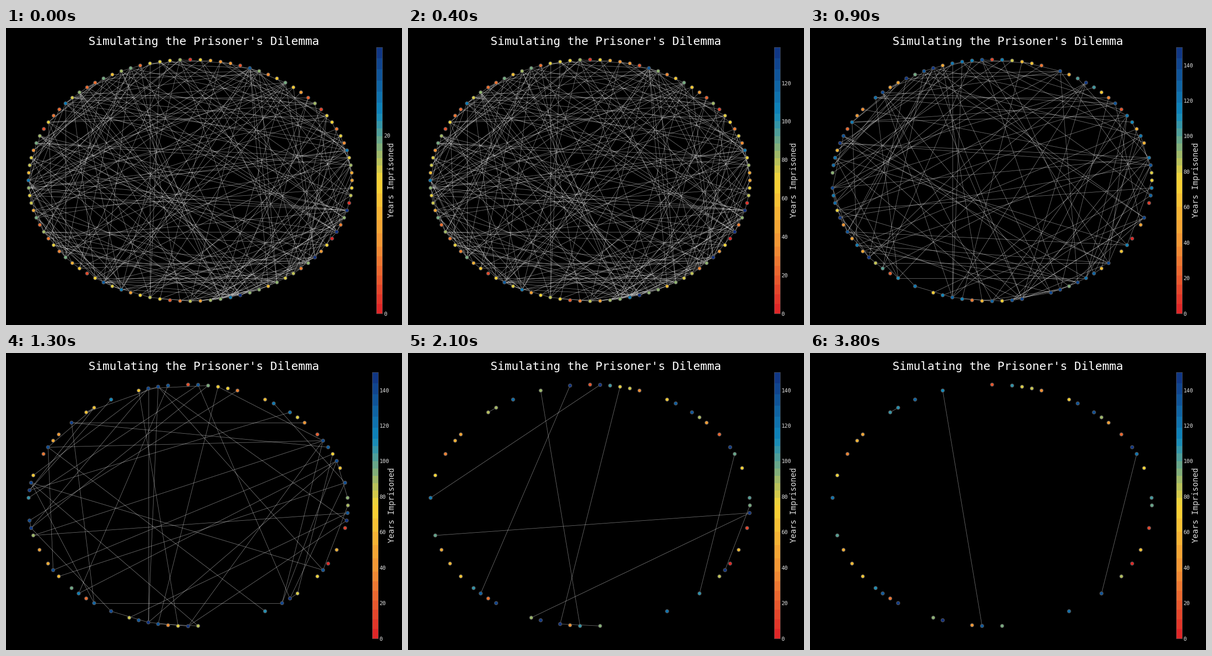
These frames come from a looping animation (864 by 648 pixels, 4 s). A matplotlib script:

```python
import numpy as np
import matplotlib.pyplot as plt
from matplotlib.animation import FuncAnimation
from matplotlib.collections import LineCollection
from matplotlib.colors import LinearSegmentedColormap

W, H, DPI = 864, 648, 72
N, LIMIT = 100, 150
STEPS, LAST = 40, 38
SETTLE, SLOW = 10, 22

plt.rcParams["font.family"] = "DejaVu Sans Mono"

# Players who stay, from the mildest sentence to the harshest.
STAYERS = [92, 97, 25, 10, 64, 43, 20, 73, 12, 40, 56, 41, 58, 94, 60, 17, 5,
           46, 22, 21, 90, 13, 69, 76, 0, 54, 1, 23, 62, 36, 35, 30, 49, 83,
           33, 7, 63, 16, 14, 74, 87, 65, 8, 70]
# Players who leave, by wave; everybody else goes in the third one.
FIRST = [4, 19, 39, 50, 66, 68, 79, 80, 89, 93, 96]
SECOND = [2, 11, 15, 18, 26, 31, 32, 34, 37, 44, 45, 51, 55, 57, 61, 77, 78,
          81, 82, 84, 88, 95]
FOURTH = [24, 27, 72, 91, 99]
THIRD = sorted(set(range(N)) - set(STAYERS + FIRST + SECOND + FOURTH))

ENDLESS = [(30, 74), (7, 87), (35, 36)]
LONG = [(24, 49), (27, 63), (22, 72), (54, 99), (69, 99), (0, 91), (72, 76),
        (38, 12), (65, 85), (29, 71), (47, 91), (14, 48), (3, 60), (42, 83)]

# Wave members, range of leaving steps, games each one plays.
WAVES = [(FIRST, (5, 8), 10), (SECOND, (10, 13), 4), (THIRD, (14, 21), 2),
         (FOURTH, (23, 29), 0)]

rng = np.random.default_rng(7)


def final_years():
    """Level each player's years settle at; above the limit means removal."""
    level = np.empty(N)
    level[STAYERS] = 4 + 146 * np.linspace(0, 1, len(STAYERS)) ** 0.75
    for wave, (lo, hi), _ in WAVES:
        leave = rng.integers(lo, hi, len(wave))
        level[wave] = LIMIT / np.tanh((leave + 0.5) / SETTLE)
    return level


def build_edges(level):
    edges = set(ENDLESS + LONG)
    chance = np.minimum(level, LIMIT)
    for wave, _, games in WAVES:
        for a in wave:
            p = chance.copy()
            p[a] = 0
            for b in rng.choice(N, games, replace=False, p=p / p.sum()):
                edges.add((a, int(b)))
        chance[wave] = 0
    return np.array(sorted(edges))


LEVEL = final_years()
EDGES = build_edges(LEVEL)
PACE = np.full(N, SETTLE)
PACE[np.ravel(ENDLESS)] = SLOW
ANGLE = 2 * np.pi * np.arange(N) / N

CMAP = LinearSegmentedColormap.from_list(
    "years", ["#de1f26", "#f39134", "#fad734", "#0e89be", "#103080"])

fig = plt.figure(figsize=(W / DPI, H / DPI), dpi=DPI, facecolor="black")
ax = fig.add_axes([0, 0, 1, 1])
ax.set(xlim=(0, W), ylim=(H, 0))
ax.axis("off")
ax.text(432, 37, "Simulating the Prisoner's Dilemma", color="white",
        size=25.4, ha="center", va="baseline")
label = ax.text(841, 332, "Years Imprisoned", color="#dddddd", size=17,
                rotation=90, ha="center", va="center")
lines = LineCollection([], colors="white", linewidths=0.75, alpha=0.55,
                       zorder=1)
ax.add_collection(lines)
dots = ax.scatter([], [], s=56, c=[], cmap=CMAP, edgecolors="#555555",
                  linewidths=1.2, zorder=2)

BAR_TOP, BAR_BOTTOM, BAR_W = 42, 622.5, 13
bar = fig.add_axes([0, 0, 0.1, 0.1], facecolor="black")
# Each leg of the colour map has its own number of bands.
bands = np.concatenate(
    [(leg + np.arange(n) / n) / 4 for leg, n in enumerate((7, 5, 9, 6))]
    + [[1]])
bar.pcolormesh([0, 1], bands, ((bands[1:] + bands[:-1]) / 2)[:, None],
               cmap=CMAP, vmin=0, vmax=1)
bar.set(xlim=(0, 1), ylim=(0, 1), xticks=[])
bar.yaxis.tick_right()
bar.tick_params(axis="y", length=0, pad=2.5, labelsize=12,
                labelcolor="#dddddd")
for spine in bar.spines.values():
    spine.set(color="#555555", linewidth=0.8)


def draw(step):
    years = LEVEL * np.tanh((min(step, LAST) + 1) / PACE)
    alive = years <= LIMIT
    top = min(years.max(), LIMIT)

    # Three-digit tick labels take room from the network.
    wide = top >= 100
    cx, rx, bar_x = (397.3, 348.7, 799) if wide else (402, 353, 808.3)
    pos = np.column_stack([cx + rx * np.cos(ANGLE),
                           332.5 - 263.5 * np.sin(ANGLE)])

    lines.set_segments(pos[EDGES[alive[EDGES].all(axis=1)]])
    dots.set_offsets(pos[alive])
    dots.set_array(years[alive])
    dots.set_clim(0, top)

    bar.set_position([bar_x / W, 1 - BAR_BOTTOM / H, BAR_W / W,
                      (BAR_BOTTOM - BAR_TOP) / H])
    ticks = np.arange(0, top + 1e-6, 20)
    bar.set_yticks(ticks / top, [f"{v:.0f}" for v in ticks])
    label.set_x(842 if wide else 840.8)
    return lines, dots


anim = FuncAnimation(fig, draw, frames=STEPS, interval=100, repeat=True,
                     repeat_delay=0, blit=False)
plt.show()
```
